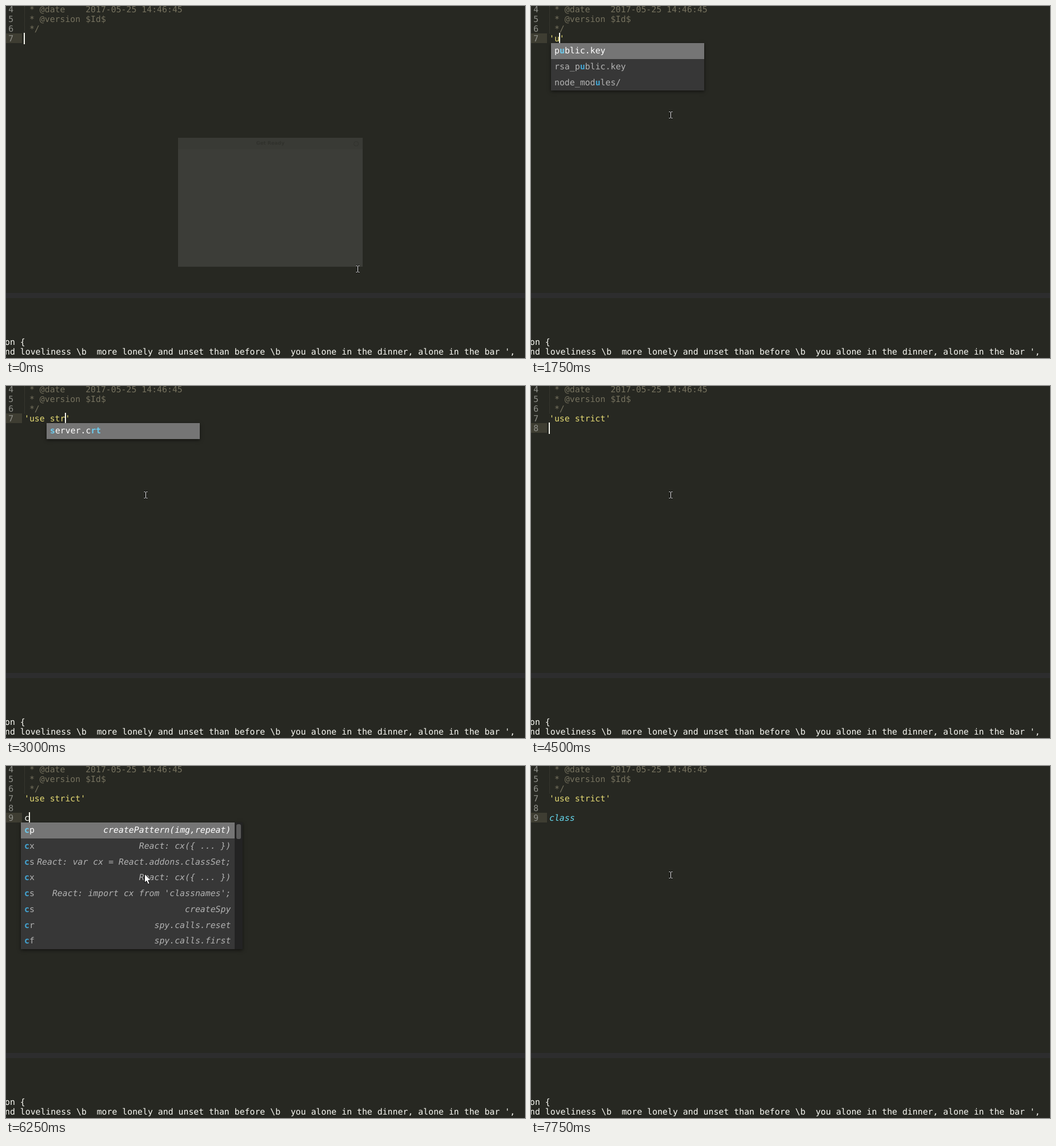
Recreate the animation shown at these times as an HTML page. Size 908 by 617 pixels, loop 8000 ms.

```html
<!DOCTYPE html>
<html lang="en">
<head>
<meta charset="utf-8">
<title>Editor autocompletion</title>
<style>
  html, body { margin: 0; width: 100%; height: 100%; overflow: hidden; background: #272822; }
  #stage {
    position: relative; width: 908px; height: 617px; overflow: hidden;
    background: #272822; color: #f8f8f2;
    font: 14.83px/17px "DejaVu Sans Mono", monospace;
    text-rendering: geometricPrecision; font-variant-ligatures: none;
  }
  #stage div, #stage svg { position: absolute; }
  .text, .number { white-space: pre; line-height: 19px; }
  .text { left: 32px; }
  .number { left: 4.3px; color: #8f908a; }
  .active { left: 0; width: 28px; height: 17px; background: #3e3d32; }
  .comment { color: #75715e; }
  .string { color: #e6db74; }
  .keyword { color: #66d9ef; font-style: italic; }
  .guide { left: 32px; top: 0; height: 48px; border-left: 1px dotted #45453b; }
  .divider { left: 0; top: 503px; width: 908px; height: 9px; background: #2d2d2e; }
  .caret { width: 2px; height: 20px; background: #f8f8f0; }
  .popup { background: #373737; color: #b2b2b2; box-shadow: 0 2px 6px rgba(0, 0, 0, .55); }
  .row { left: 0; height: 27.75px; line-height: 28.5px; white-space: pre; }
  .row span { position: absolute; left: 6px; }
  .row i { position: absolute; right: 6.6px; }
  .row b { color: #43a5d3; }
  .row.selected { background: #757575; color: #fff; }
  .row.selected b { color: #6dcbee; }
  .track { left: 374px; top: 0; width: 14px; height: 100%; background: #232323; }
  .thumb { left: 377px; top: 3px; width: 8px; height: 26px; border-radius: 3px; background: #5b5b5b; }
  .dialog { left: 301px; top: 231px; width: 323px; height: 226px; background: #3c3d38; border-radius: 2px 2px 0 0; }
  .title {
    left: 0; top: 0; width: 100%; height: 20px; background: #393a35; color: #30312c;
    font: bold 8.5px/20px "DejaVu Sans", sans-serif; text-align: center;
  }
  .button { left: 307px; top: 6px; width: 7px; height: 7px; border: 1px solid #31322d; border-radius: 50%; }
</style>
</head>
<body>
<div id="stage">
  <div class="guide"></div>
  <div class="divider"></div>
  <div class="text" style="left:-2px;top:580px">on {</div>
  <div class="text" style="left:-2px;top:597px">nd loveliness \b  more lonely and unset than before \b  you alone in the dinner, alone in the bar ',</div>
  <div id="editor"></div>
  <div class="dialog" id="dialog"><div class="title">Get Ready</div><div class="button"></div></div>
  <svg id="beam" width="9" height="14" viewBox="0 0 9 14" fill="none">
    <path d="M1.5 1.5H3.5L4.5 2.5L5.5 1.5H7.5M4.5 2V12M1.5 12.5H3.5L4.5 11.5L5.5 12.5H7.5" stroke="#111" stroke-width="2.6"/>
    <path d="M1.5 1.5H3.5L4.5 2.5L5.5 1.5H7.5M4.5 2V12M1.5 12.5H3.5L4.5 11.5L5.5 12.5H7.5" stroke="#eee"/>
  </svg>
  <svg id="arrow" width="15" height="21" viewBox="0 0 15 21" style="left:241px;top:188px">
    <path d="M1.5 1V16.5L5 13.4L7.5 19.2L10.2 18L7.8 12.4H12.6Z" fill="#fff" stroke="#111"/>
  </svg>
</div>
<script>
const LOOP = 8000, CELL = 8.928, LINE = 17, ROW = 27.75;
const byId = id => document.getElementById(id);
const lineTop = n => 48 + (n - 7) * LINE;

const header = [" * @date    2017-05-25 14:46:45", " * @version $Id$", " */"];

// Asterisks mark the matched letters; "|" separates a label from its hint.
const files = ["app.js", "index.html", "node_modules/", "package.json", "public.key", "README.md", "rsa_public.key", "server.crt"];
const filesU = ["p*u*blic.key", "rsa_p*u*blic.key", "node_mod*u*les/"];
const filesUs = ["r*s*a_p*u*blic.key", "node_mod*u*le*s*/"];
const filesS = ["*s*erver.crt", "r*s*a_public.key", "app.j*s*", "node_module*s*/", "package.j*s*on"];
const filesStr = ["*s*erver.c*rt*"];
const snippets = [
  "*c*p|createPattern(img,repeat)", "*c*x|React: cx({ ... })",
  "*c*s|React: var cx = React.addons.classSet;", "*c*x|React: cx({ ... })",
  "*c*s|React: import cx from 'classnames';", "*c*s|createSpy",
  "*c*r|spy.calls.reset", "*c*f|spy.calls.first"
];
const snippetsCl = ["*cl*|console.log", "*cl*ass|class"];
const snippetsCla = ["*cla*ss|class"];

const strict = "'use strict'";
const base = { lines: [""], col: 0, caret: 1, mouse: "beam" };
const quoted = (word, list, anchor = 1, mouse = "beam") =>
  ({ lines: [`'${word}'`], col: word.length + 1, list, anchor, mouse });
const coded = (lines, list, mouse = "beam", caret = 1) =>
  ({ lines: [strict, ...lines], col: lines[lines.length - 1].length, list, anchor: 0, mouse, caret });

const steps = [
  [0, { dialog: true, mouse: "far" }],
  [250, { caret: 0, mouse: "far" }],
  [500, { caret: 0 }],
  [750, {}],
  [1250, quoted("", files)],
  [1500, quoted("", files, 1, "arrow")],
  [1750, quoted("u", filesU)],
  [2000, quoted("us", filesUs)],
  [2250, quoted("use")],
  [2500, quoted("use ", files, 5, "arrow")],
  [2750, quoted("use s", filesS, 5, "arrow")],
  [3000, quoted("use str", filesStr, 5)],
  [3250, quoted("use stri")],
  [3500, quoted("use strict")],
  [4000, { ...quoted("use strict"), caret: 0 }],
  [4250, { lines: [strict], col: 12 }],
  [4500, coded([""])],
  [4750, coded(["c"], snippets)],
  [5000, coded(["c"], snippets, "arrow")],
  [5250, coded(["c"], snippets, "arrow", .5)],
  [5500, coded(["c"], snippets, "arrow", 0)],
  [5750, coded([""], null, "arrow")],
  [6000, coded(["", ""], null, "arrow")],
  [6250, coded(["", "c"], snippets, "arrow")],
  [6500, coded(["", "cl"], snippetsCl)],
  [6750, coded(["", "cla"], snippetsCla)],
  [7000, coded(["", "clas"], snippetsCla)],
  [7250, coded(["", "class"])],
  [7500, coded(["", "class "])],
  [7750, coded(["", "class "], null, "beam", 0)]
];

const box = (cls, style, content = "") => `<div class="${cls}" style="${style}">${content}</div>`;

function lineHtml(n, text, kind) {
  const top = `top:${lineTop(n)}px`;
  return box("number", top, n) + box(`text ${kind}`, top, text);
}

function kindOf(text) {
  if (text.startsWith("'")) return "string";
  return text.trim() === "class" ? "keyword" : "";
}

function popupHtml({ list, anchor }, n) {
  const wide = list === snippets || list === snippetsCl || list === snippetsCla;
  const scrolls = list === snippets;
  const width = wide ? 374 : 268;
  const rows = list.map((item, i) => {
    const [label, hint = ""] = item.replace(/\*(.+?)\*/g, "<b>$1</b>").split("|");
    return box(i ? "row" : "row selected", `top:${i * ROW}px;width:${width}px`,
      `<span>${label}</span><i>${hint}</i>`);
  }).join("");
  const bar = scrolls ? box("track", "") + box("thumb", "") : "";
  const left = Math.round(26 + anchor * CELL);
  return box("popup", `left:${left}px;top:${lineTop(n) + LINE}px;` +
    `width:${width + (scrolls ? 14 : 0)}px;height:${list.length * ROW}px`, rows + bar);
}

function render(state) {
  const s = { ...base, ...state };
  const current = 6 + s.lines.length;
  const top = lineTop(current);
  let html = box("active", `top:${top}px`);
  header.forEach((text, i) => html += lineHtml(4 + i, text, "comment"));
  s.lines.forEach((text, i) => html += lineHtml(7 + i, text, kindOf(text)));
  const caretLeft = Math.floor(31.6 + s.col * CELL);
  html += box("caret", `left:${caretLeft}px;top:${top - 1}px;opacity:${s.caret}`);
  if (s.list) html += popupHtml(s, current);
  byId("editor").innerHTML = html;

  byId("dialog").style.display = s.dialog ? "" : "none";
  byId("arrow").style.display = s.mouse === "arrow" ? "" : "none";
  const beam = byId("beam").style;
  beam.display = s.mouse === "arrow" ? "none" : "";
  [beam.left, beam.top] = s.mouse === "far" ? ["611px", "454px"] : ["240px", "184px"];
}

const start = performance.now();
let shown;
function tick() {
  const time = (performance.now() - start) % LOOP;
  const step = steps.findLast(([at]) => at <= time);
  if (step !== shown) render((shown = step)[1]);
  requestAnimationFrame(tick);
}
tick();
</script>
</body>
</html>
```
